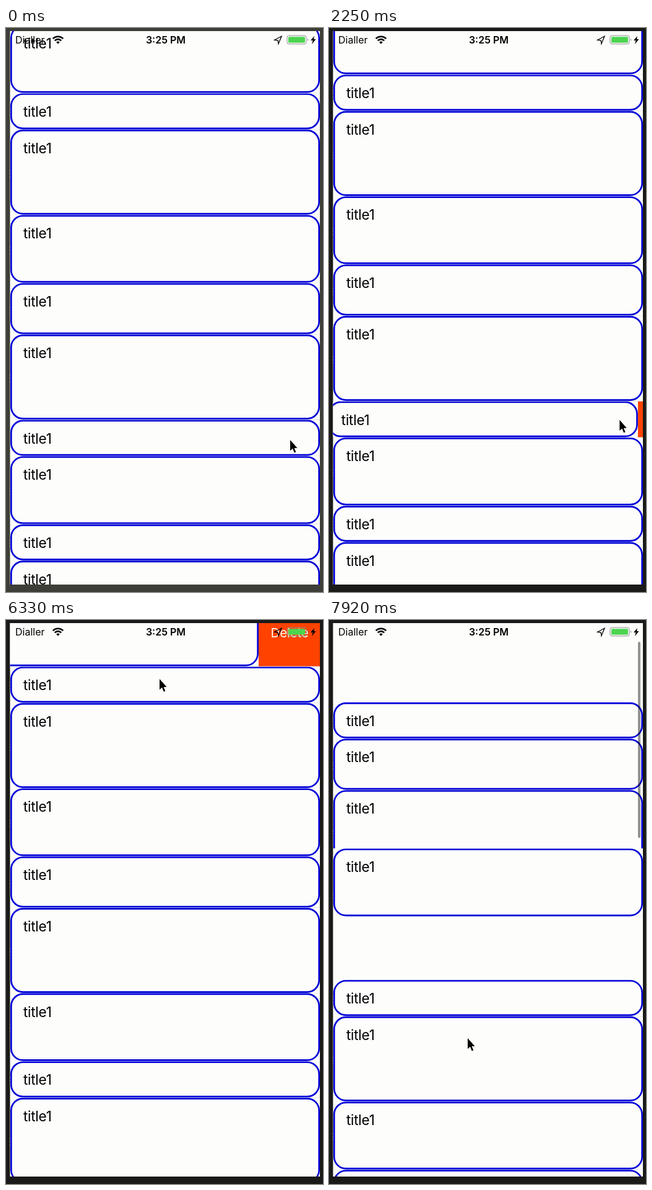
Animation of 512 by 909 pixels, one loop 8000 ms. Source, as an HTML page:

```html
<!DOCTYPE html>
<html lang="en">
<head>
<meta charset="utf-8">
<title>Table with swipe to delete</title>
<style>
  html, body { margin: 0; width: 100%; height: 100%; overflow: hidden; background: #1a1a18; }
  svg { display: block; width: 100%; height: 100%; }
  text { font-family: Inter, Roboto, sans-serif; fill: #000; }
  .title { font-size: 22.6px; letter-spacing: -.3px; }
  .delete { font-size: 20.5px; fill: #fffaf0; text-anchor: middle; letter-spacing: -.2px; }
  .status { font-size: 16px; }
  .clock { font-size: 16px; font-weight: 600; text-anchor: middle; }
  .card { fill: none; stroke: #0000d8; stroke-width: 2.67; }
  .paper { fill: #fdfdfc; }
</style>
</head>
<body>
<svg viewBox="0 0 512 909" preserveAspectRatio="none">
  <defs><clipPath id="screen"><rect x="6.5" y="5" width="500.5" height="892"/></clipPath></defs>
  <rect id="frame" width="512" height="909"/>
  <g clip-path="url(#screen)">
    <rect class="paper" x="6" y="5" width="501" height="892"/>
    <g id="rows"></g>
    <rect id="bar" x="499" width="4" rx="2" fill="#000" fill-opacity=".42"/>
  </g>
  <text class="status" x="15" y="25">Dialler</text>
  <g fill="none" stroke="#000" stroke-width="2.6">
    <path d="M75.7 17.2A11.7 11.7 0 0 1 92.3 17.2M78.8 20.3A7.4 7.4 0 0 1 89.2 20.3"/>
    <path d="M84 25.8L81.2 22.9A4 4 0 0 1 86.8 22.9Z" fill="#000" stroke="none"/>
  </g>
  <text class="clock" x="258" y="25">3:25 PM</text>
  <path d="M445 13.3L433.8 19.3L439.2 20L440 25.6Z" fill="none" stroke="#000" stroke-width="1.3"/>
  <rect x="454" y="12.2" width="31" height="13.6" rx="3" fill="none" stroke="#8c8c88"/>
  <rect x="456" y="14.2" width="27" height="9.6" rx="1.5" fill="#4cd450"/>
  <path d="M487 17Q489.6 19 487 21Z" fill="#8c8c88"/>
  <path d="M498 13L492 20H495.5L494 26L500.5 18H497Z"/>
  <path id="cursor" d="M0 0V17.3L4 13.8L6.7 20.5L9.3 19.4L6.6 12.9H11.5Z" stroke="#fffff4" stroke-width="2" paint-order="stroke"/>
</svg>
<script>
const LOOP = 8000;
const LEFT = 7, WIDTH = 500, RIGHT = LEFT + WIDTH, OPEN = 100;
const TOP = -342.2, REST = 32;

const size = { s: 58.6, m: 82.8, l: 109.8, x: 137.6 };
const heights = [..."smxslsxlmxslsxl"].map(c => size[c]);
const KEPT = 4, REMOVED = 10;

// Pointer stops as [time, x, y]; the final pull is added on top.
const stops = [
  [0, 459, 664], [1250, 380, 689], [2150, 470, 632], [3500, 430, 620],
  [4670, 316, 66], [5300, 400, 52], [6330, 248, 95]
];

// Eased progress from 0 to 1 between two times.
function ramp(t, from, to) {
  const u = Math.min(1, Math.max(0, (t - from) / (to - from)));
  return u * u * (3 - 2 * u);
}

function pointer(t) {
  let [, x, y] = stops[0];
  for (let i = 1; i < stops.length; i++) {
    const [t0, x0, y0] = stops[i - 1], [t1, x1, y1] = stops[i];
    const k = ramp(t, t0, t1);
    x += (x1 - x0) * k;
    y += (y1 - y0) * k;
  }
  const pull = ramp(t, 6330, 7867);
  return [x - 40 * pull + 16 * pull ** 4, y + 579 * pull];
}

const $ = id => document.getElementById(id);
const set = (el, attrs) => { for (const k in attrs) el.setAttribute(k, attrs[k]); return el; };
function add(parent, tag, attrs, label) {
  const el = set(document.createElementNS("http://www.w3.org/2000/svg", tag), attrs);
  if (label) el.textContent = label;
  return parent.appendChild(el);
}

function makeRow(h) {
  const g = add($("rows"), "g", {});
  const paper = { class: "paper", x: LEFT, width: WIDTH, height: h };
  add(g, "rect", paper);
  add(g, "path", { d: `M27 ${h - .35}H${RIGHT}`, stroke: "#c8c7cc", "stroke-width": .7 });
  const button = add(g, "rect", { height: h - .67, fill: "#ff4200" });
  const label = add(g, "text", { class: "delete", y: h / 2 + 8 }, "Delete");
  const cell = add(g, "g", {});
  add(cell, "rect", { ...paper, height: h - .67 });
  add(cell, "rect", { class: "card", x: LEFT + 1.33, y: 1.33, width: WIDTH - 2.67, height: h - 3.33, rx: 19 });
  add(cell, "text", { class: "title", x: 28, y: 38 }, "title1");
  return { g, button, label, cell };
}

const rows = heights.map(makeRow);
$("rows").prepend(rows[REMOVED].g);
$("rows").append(rows[KEPT].g);

function swipe(row, dx) {
  set(row.cell, { transform: `translate(${-dx} 0)` });
  set(row.button, { x: RIGHT - dx, width: dx });
  set(row.label, { x: RIGHT - Math.min(dx, OPEN) + OPEN / 2 });
  row.label.style.display = dx > 0 ? "" : "none";
}

function draw(t) {
  const scroll = 505 * ramp(t, 6350, 7867) - 30 * ramp(t, 650, 1450);
  const gone = ramp(t, 3650, 4050);

  let y = TOP + scroll;
  rows.forEach((row, i) => {
    // The kept row loses its place once the list above it reloads.
    const slip = i === KEPT && t >= 6900 ? -102 : 0;
    set(row.g, { transform: `translate(0 ${y + slip})` });
    y += heights[i] * (i === REMOVED ? 1 - gone : 1);
  });
  swipe(rows[KEPT], 99 * (ramp(t, 5300, 5900) - ramp(t, 6800, 7390)));
  swipe(rows[REMOVED], 108 * ramp(t, 2150, 2750) + (WIDTH - 108) * ramp(t, 3650, 3950));
  rows[REMOVED].g.style.display = gone < 1 ? "" : "none";

  const content = 1960 - 142 * gone;
  const offset = REST - TOP - scroll;
  set($("bar"), {
    y: 35 + Math.max(0, offset) * 860 / content,
    height: 758000 / content + Math.min(0, offset),
    opacity: ramp(t, 650, 750) - ramp(t, 1750, 2050) + ramp(t, 6350, 6450)
  });

  set($("cursor"), { transform: `translate(${pointer(t)})` });
  set($("frame"), { fill: t < 80 ? "#3e3e38" : "#1a1a18" });
}

const start = performance.now();
function tick() {
  draw((performance.now() - start) % LOOP);
  requestAnimationFrame(tick);
}
tick();
</script>
</body>
</html>
```
